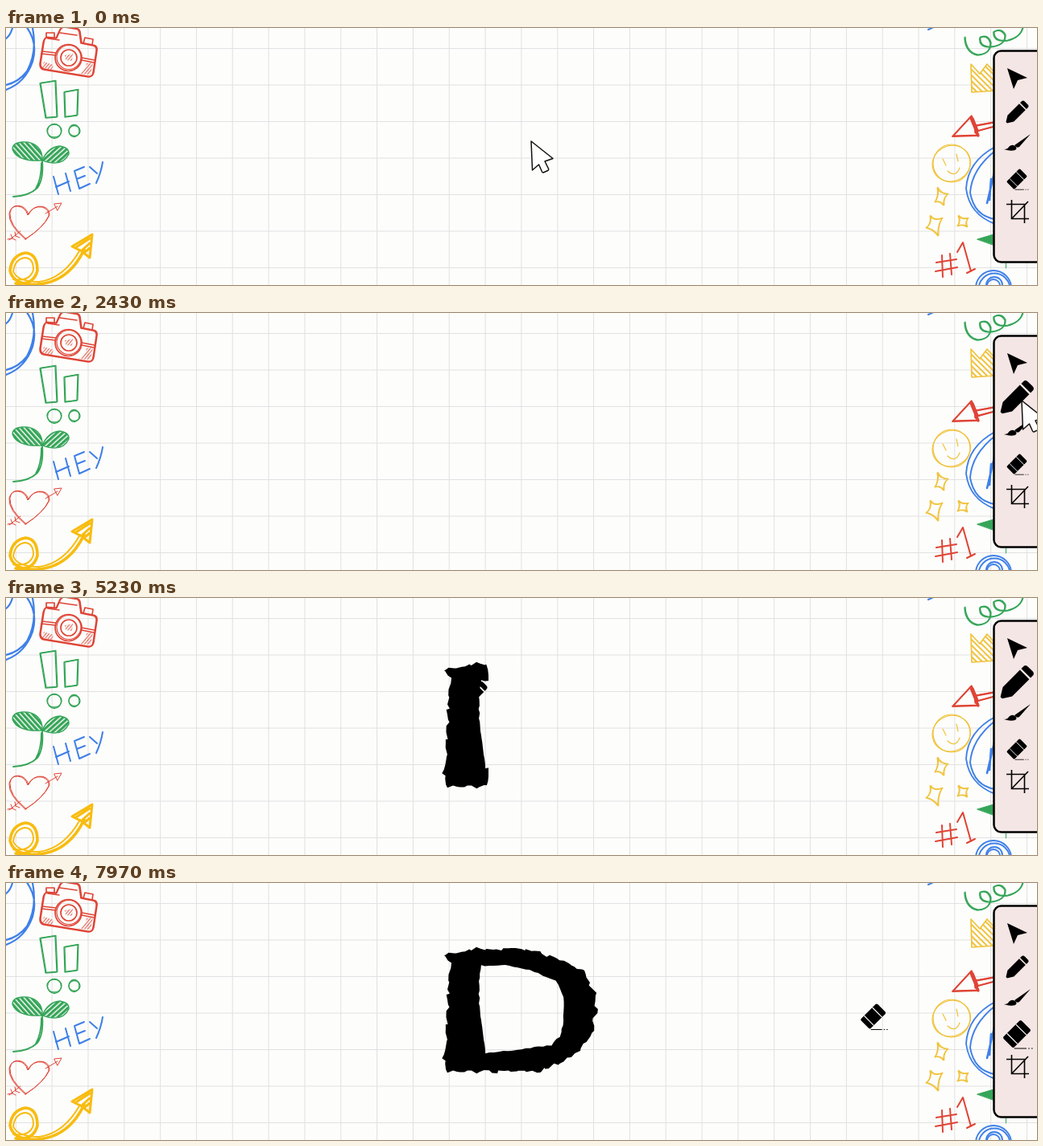
An HTML page that plays this animation: 1280x320 px, repeating every 8 s.

```html
<!DOCTYPE html>
<html lang="en">
<head>
<meta charset="utf-8">
<title>Drawing tools</title>
<style>
  html, body { margin: 0; width: 100%; height: 100%; overflow: hidden; background: #fdfdfb; }
  svg { display: block; width: 1280px; height: 320px; }
  .ink { fill: none; stroke-linecap: round; stroke-linejoin: round; }
  .red { stroke: #df4436; }
  .green { stroke: #35a558; }
  .blue { stroke: #3f80e8; }
  .gold { stroke: #f0c23a; }
</style>
</head>
<body>
<svg viewBox="0 0 1280 320">
  <defs>
    <pattern id="hatchLeft" width="4.6" height="4.6" patternUnits="userSpaceOnUse" patternTransform="rotate(-42)">
      <path d="M0 0V5" stroke="#35a558" stroke-width="6.4"/>
    </pattern>
    <pattern id="hatchRight" width="4.6" height="4.6" patternUnits="userSpaceOnUse" patternTransform="rotate(48)">
      <path d="M0 0V5" stroke="#35a558" stroke-width="6.4"/>
    </pattern>
    <pattern id="hatchGold" width="5" height="5" patternUnits="userSpaceOnUse" patternTransform="rotate(-45)">
      <path d="M0 0V6" stroke="#f0c23a" stroke-width="4"/>
    </pattern>
    <pattern id="hatchRed" width="3" height="3" patternUnits="userSpaceOnUse" patternTransform="rotate(40)">
      <path d="M0 0V3" stroke="#df4436" stroke-width="2.4"/>
    </pattern>

    <g id="pencil" transform="rotate(-45)">
      <path d="M-22.4 1.2V-1.2L-14 -6.4H9.5V6.4H-14Z"/>
      <path d="M11.3 -6.4H14Q17.3 -6.4 17.3 -3V3Q17.3 6.4 14 6.4H11.3Z"/>
    </g>
    <g id="eraser">
      <g transform="rotate(-45)">
        <rect x="-14.5" y="-8.5" width="29" height="17" rx="2"/>
        <path d="M-7.5 -8.5V8.5M7 -8.5V8.5" stroke="#fff" stroke-width="1.1"/>
      </g>
      <path d="M-3 16.5H11M13 16.5h1.5M16.5 16.5h1.5" stroke="#000" stroke-width="1"/>
    </g>
    <mask id="reveal" maskUnits="userSpaceOnUse" x="500" y="50" width="280" height="220">
      <path id="stroke" class="ink" stroke="#fff" stroke-width="66"
        d="M566 96L566 222L566 92L640 92Q712 105 712 155Q706 222 640 222L562 225"/>
    </mask>
  </defs>

  <rect width="1280" height="320" fill="#fdfdfb"/>
  <path id="grid" stroke="#e1e1e4" fill="none"/>

  <g class="ink red" stroke-width="1.7">
    <path data-double d="M50 12Q47 13 46 19L42 45Q42 51 47 52L102 61Q107 61 108 56L112 29Q113 23 108 22L93 19Q92 12 91 5Q90 1 85 1L73 -1Q68 -1 66 4L62 13Z"/>
    <path d="M52 13L66 15M50 12V6L60 6V12M96 19L98 12L108 14L107 21M44 32L62 34M94 40L109 43M45 29L62 31M94 37L110 40M67 6L88 9"/>
    <circle cx="77.5" cy="37" r="16.5"/><circle cx="78" cy="36.5" r="15" stroke-width="1.2"/>
    <circle cx="78" cy="37" r="10"/>
    <path d="M108 43L105 58L90 57Q99 53 100 44ZM73 34L83 32L82 41L74 40ZM47 42L59 46L57 52L45 50Z" fill="url(#hatchRed)" stroke="none" opacity=".8"/>
  </g>

  <g class="ink green" stroke-width="1.3">
    <path data-double d="M42 69L61 66L63 111L49 112ZM72 80L89 77L88 109L73 111Z"/>
    <ellipse cx="60" cy="128.5" rx="8.5" ry="9"/><ellipse cx="60" cy="128" rx="9" ry="8"/>
    <ellipse cx="84.5" cy="128" rx="6.5" ry="7.5"/><ellipse cx="85" cy="128" rx="7" ry="6.5"/>
    <path d="M45 165C46 150 36 141 20 142Q8 143 8 151Q14 167 45 165Z" fill="url(#hatchLeft)"/>
    <path d="M45 165Q52 148 67 147Q79 149 78 157Q70 174 45 165Z" fill="url(#hatchRight)"/>
    <path d="M45 165Q47 188 39 199Q29 209 9 210M44 168Q44 188 37 200" stroke-width="1.8"/>
  </g>

  <g class="ink blue">
    <path stroke-width="2" d="M59 185L65 207M74 181L80 203M62 198L78 191M97 173L85 178L91 200L104 194M88 188L98 184M104 173L113 181M120 167Q118 180 112 193"/>
    <path stroke-width="2.2" d="M0 13Q5 10 8 0M25 -2Q40 18 33 42Q24 68 0 77M33 0Q39 30 26 54Q16 67 0 71"/>
    <path stroke-width="2" d="M1145 2L1156 -3"/>
  </g>

  <g class="ink red" stroke-width="1">
    <path data-double d="M24 263Q3 246 4 231Q6 221 15 222Q24 223 27 233Q33 221 45 223Q54 226 53 234Q46 249 24 263Z"/>
    <path d="M49 231L64 222M60 219L69 218L64 227ZM4 264L18 253M6 257L8 262L2 263M11 254L12 259M12 259L17 261M8 262L12 264"/>
  </g>

  <g class="ink" stroke="#f8bc10" stroke-width="3.6">
    <path d="M12 318Q34 321 39 302Q39 281 24 280Q7 283 5 302Q9 321 40 319Q78 316 97 276"/>
    <path d="M9 313Q30 316 34 301Q34 286 23 286Q11 288 9 303Q14 316 41 316Q72 312 92 276" stroke-width="2"/>
    <path d="M82 272L107 257L104 286L94 278ZM87 273L104 262M95 276L104 268M98 279L104 274" stroke-width="3"/>
  </g>

  <g class="ink green" stroke-width="1.5">
    <path data-double d="M1190 12Q1191 31 1206 34Q1222 33 1222 19Q1219 8 1209 12Q1207 24 1222 24Q1241 22 1240 9Q1235 0 1226 5Q1225 18 1243 16Q1259 12 1262 0"/>
    <path d="M1206 263L1226 257V270Z" fill="#35a558" stroke-width="1"/>
    <path d="M1241.5 293V299" stroke-width="1"/>
  </g>

  <path class="ink gold" stroke-width="1.7" style="fill:url(#hatchGold)" d="M1198 45L1209 57L1218 45L1228 56V78L1199 80Z"/>
  <g class="ink gold" stroke-width="1.2">
    <ellipse cx="1173.5" cy="168.5" rx="24" ry="22" transform="rotate(-24 1174 168)"/>
    <ellipse cx="1174" cy="168.5" rx="23" ry="23.5"/>
    <path d="M1163 163L1167 171M1180 157L1182 166M1169 178Q1179 187 1184 174"/>
    <path data-double d="M1156 199Q1160 207 1169 207Q1163 212 1164 221Q1159 215 1153 217Q1158 209 1156 199ZM1147 234Q1152 241 1162 237Q1156 246 1157 259Q1151 251 1142 249Q1149 244 1147 234ZM1182 234Q1187 239 1194 237Q1190 242 1193 248Q1188 244 1181 247Q1185 241 1182 234Z"/>
  </g>

  <g class="ink red" stroke-width="1.8">
    <path data-double d="M1175 135L1198 110L1206 134ZM1203 122L1230 117M1204 129L1230 122"/>
    <path d="M1198 112L1207 134M1200 113L1206 128M1203 120L1204 130" stroke-width="3.4"/>
    <path d="M1162 283L1163 310M1172 281L1174 307M1155 292L1180 288M1154 303L1181 298M1181 279L1188 267L1198 303M1193 305L1203 300" stroke-width="2"/>
  </g>

  <g class="ink blue" stroke-width="1.9">
    <path d="M1228 148Q1194 166 1192 200Q1196 232 1228 244M1228 153Q1199 176 1197 205Q1202 234 1228 238"/>
    <path d="M1227 180L1218 218M1223 188L1221 214" stroke-width="2.6"/>
    <circle cx="1226" cy="324" r="22"/><circle cx="1227" cy="325" r="19.5"/>
    <circle cx="1227" cy="320" r="10"/><circle cx="1226" cy="321" r="8"/>
  </g>

  <path id="letter" fill-rule="evenodd" mask="url(#reveal)"/>

  <rect x="1226.5" y="28.5" width="80" height="263" rx="9" fill="#f4e6e4" stroke="#000" stroke-width="2.5"/>
  <path d="M1243 50L1268 62L1256 65L1251 76Z"/>
  <path d="M1272 132L1258 148Q1255 150 1252 146ZM1251 146Q1257 149 1253 152Q1247 154 1239 151Q1244 151 1245 148Q1248 145 1251 146Z"/>
  <path d="M1242 219.5H1264.5V243M1248.5 214V237.5H1270M1249 237L1269 216" fill="none" stroke="#000" stroke-width="1.6"/>
  <use id="penTool" href="#pencil"/>
  <use id="rubTool" href="#eraser"/>

  <path id="arrow" fill="#fff" stroke="#111" stroke-width="1.5" stroke-linejoin="round"
    d="M0 0L1.5 36L9.500 29L13.500 38Q14.200 39.400 15.700 38.700L20.700 36.500Q22.200 35.800 21.500 34.300L17 25L27 21.500Z"/>
  <use id="penCursor" href="#pencil"/>
  <use id="rubCursor" href="#eraser"/>
</svg>

<script>
const $ = id => document.getElementById(id);
const LOOP = 8000;
const clamp = v => Math.min(1, Math.max(0, v));
const part = (t, a, b) => clamp((t - a) / (b - a));
const mix = (a, b, p) => a.map((v, i) => v + (b[i] - v) * p);

let grid = '';
for (let x = 12.3; x < 1280; x += 44.83) grid += `M${x} 0V320`;
for (let y = 25.5; y < 320; y += 45.5) grid += `M0 ${y}H1280`;
$('grid').setAttribute('d', grid);

// A second, slightly shifted line gives the sketched look.
for (const path of document.querySelectorAll('[data-double]')) {
  const copy = path.cloneNode();
  copy.setAttribute('transform', 'translate(0.9 -0.7)');
  path.after(copy);
}

let seed = 7;
const random = () => (seed = seed * 16807 % 2147483647) / 2147483647;

// Closed outline with a ragged edge.
function ragged(points, amount, step) {
  const out = [];
  points.forEach((p, i) => {
    const q = points[(i + 1) % points.length];
    const n = Math.ceil(Math.hypot(q[0] - p[0], q[1] - p[1]) / step);
    for (let k = 0; k < n; k++)
      out.push(mix(p, q, k / n).map(v => (v + (random() - 0.5) * amount).toFixed(1)));
  });
  return 'M' + out.join('L') + 'Z';
}
const outer = [[546, 89], [583, 82], [643, 82], [684, 94], [717, 110], [730, 134], [733, 155],
  [729, 184], [716, 204], [694, 222], [662, 234], [578, 235], [549, 236], [542, 212], [548, 188], [548, 150], [552, 106]];
const inner = [[590, 103], [620, 102], [650, 108], [683, 122], [692, 142], [692, 172], [688, 191],
  [677, 202], [640, 207], [595, 212], [592, 190], [588, 160], [587, 128]];
$('letter').setAttribute('d', ragged(outer, 5, 5) + ragged(inner, 1.6, 6));

const stroke = $('stroke');
const length = stroke.getTotalLength();
stroke.setAttribute('stroke-dasharray', `${length} ${length + 100}`);

function place(id, [x, y], scale = 1) {
  $(id).setAttribute('transform', `translate(${x} ${y}) scale(${scale})`);
}
const show = (id, on) => $(id).setAttribute('visibility', on ? 'visible' : 'hidden');

const PEN_START = 3350, DRAW = 5040, LEAVE = 5600, PEN_END = 6485, RUB_START = 7450;

function penTip(t) {
  if (t < DRAW) return mix([1240, 122], [560, 100], part(t, PEN_START, DRAW));
  if (t < LEAVE) {
    const p = stroke.getPointAtLength(length * part(t, DRAW, LEAVE));
    return [p.x, p.y];
  }
  return mix([565, 225], [1245, 205], part(t, LEAVE, PEN_END));
}

function render(t) {
  place('arrow', mix([652, 141], [1261, 109], part(t, 88, 2000)));
  show('arrow', t < PEN_START);

  const [x, y] = penTip(t);
  place('penCursor', [x + 16, y - 16]);
  show('penCursor', t >= PEN_START && t < RUB_START);

  place('rubCursor', mix([1255, 188], [1077, 166], (t - RUB_START) / (7970 - RUB_START)));
  show('rubCursor', t >= RUB_START);

  const drawn = part(t, DRAW, LEAVE);
  show('letter', drawn > 0);
  stroke.setAttribute('stroke-dashoffset', length * (1 - drawn));

  const penOn = part(t, 1980, 2120) - part(t, 6480, 6620);
  const rubOn = part(t, 6480, 6620);
  place('penTool', [1256, 104], 0.87 + 0.41 * penOn);
  place('rubTool', [1255, 188], 0.8 + 0.29 * rubOn);
}

const start = performance.now();
function tick() {
  render((performance.now() - start) % LOOP);
  requestAnimationFrame(tick);
}
tick();
</script>
</body>
</html>
```
